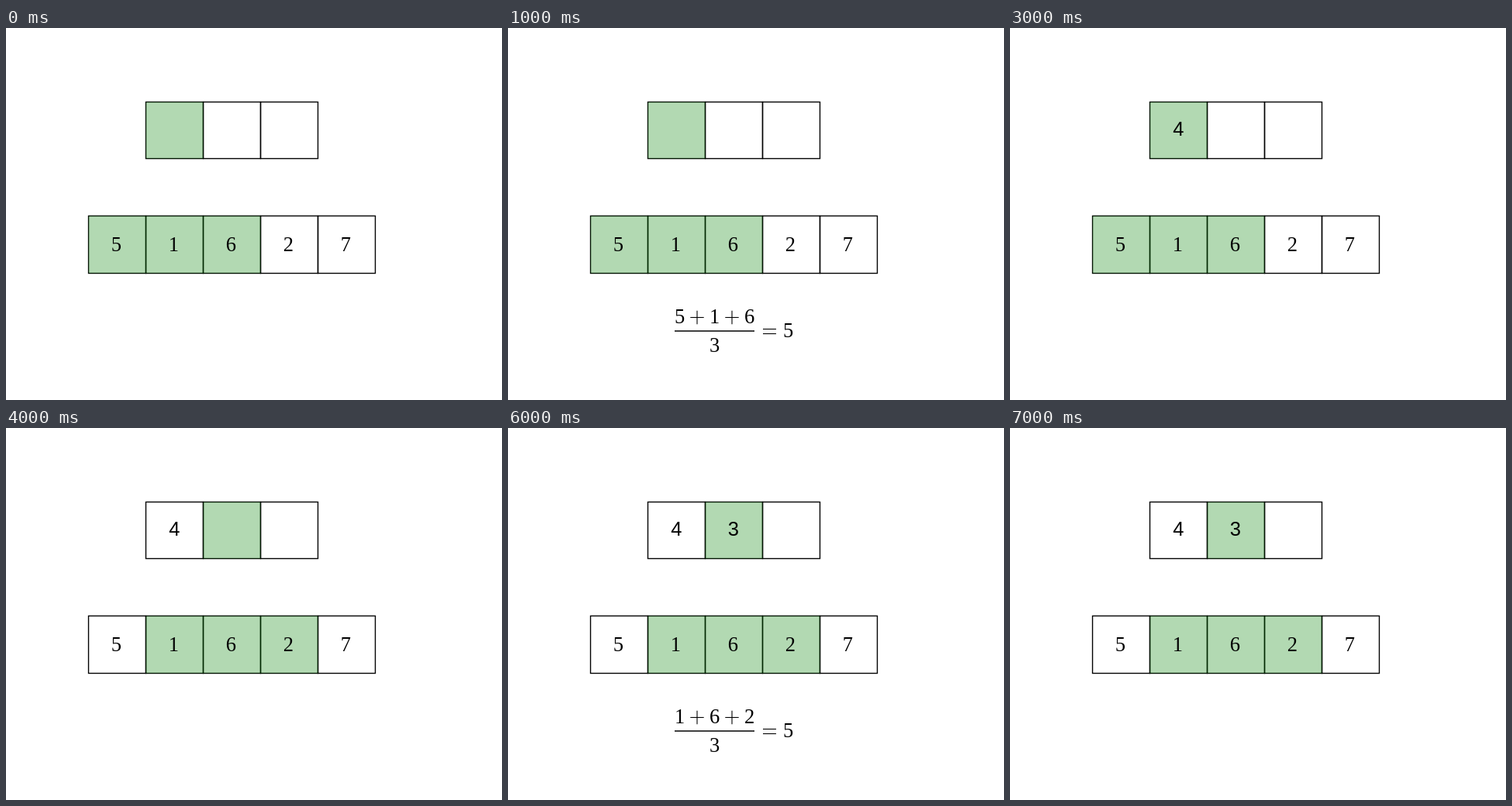
Recreate the animation shown at these times as an HTML page with a canvas. Size 640 by 480 pixels, loop 8000 ms.

```html
<!DOCTYPE html>
<html lang="en">
<head>
<meta charset="utf-8">
<title>Moving average</title>
<style>
  html, body { margin: 0; width: 640px; height: 480px; overflow: hidden; background: #fff; }
  canvas { display: block; }
</style>
</head>
<body>
<canvas id="stage" width="640" height="480"></canvas>
<script>
const ctx = document.getElementById('stage').getContext('2d');
const SERIF = '26.5px "Liberation Serif", serif';
const SANS = '25.5px "Liberation Sans", sans-serif';
const LOOP = 8000, STEP = 4000, CELL = 74;
const values = [5, 1, 6, 2, 7];
const averages = [4, 3];
const input = { x: 106.5, y: 242.5, h: 74, count: 5 };
const output = { x: 180.5, y: 95.5, h: 73, count: 3 };

function text(value, x, baseline, font = SERIF) {
  ctx.font = font;
  ctx.fillText(value, x, baseline);
}

function line(x1, y1, x2, y2, width) {
  ctx.lineWidth = width;
  ctx.beginPath();
  ctx.moveTo(x1, y1);
  ctx.lineTo(x2, y2);
  ctx.stroke();
}

function drawRow(row, first, shaded) {
  ctx.lineWidth = 1.39;
  for (let i = 0; i < row.count; i++) {
    ctx.strokeRect(row.x + i * CELL, row.y, CELL, row.h);
  }
  ctx.fillStyle = 'rgba(0, 128, 0, 0.3)';
  ctx.fillRect(row.x + first * CELL, row.y, shaded * CELL, row.h);
  ctx.fillStyle = '#000';
}

function drawPlus(x, y) {
  line(x - 8.7, y, x + 8.7, y, 1.1);
  line(x, y - 8.7, x, y + 8.7, 1.1);
}

function drawFormula(terms) {
  terms.forEach((term, i) => text(term, 221.5 + i * 45, 380.5));
  drawPlus(244, 373.5);
  drawPlus(289, 373.5);
  line(215, 391, 318, 391, 1.6);
  text(3, 266.5, 418);
  line(329, 388.5, 346, 388.5, 1.1);
  line(329, 394.5, 346, 394.5, 1.1);
  text(5, 361.5, 399);
}

function draw(time) {
  const step = Math.floor(time / STEP);
  const phase = time % STEP;
  ctx.fillStyle = '#fff';
  ctx.fillRect(0, 0, 640, 480);
  ctx.fillStyle = ctx.strokeStyle = '#000';
  ctx.textAlign = 'center';

  drawRow(output, step, 1);
  drawRow(input, step, 3);
  values.forEach((value, i) => text(value, 142.3 + i * CELL, 287.5));

  const known = step + (phase >= 2000 ? 1 : 0);
  averages.slice(0, known).forEach((value, i) => {
    text(value, 217.3 + i * 73.5, 138.7, SANS);
  });
  if (phase >= 1000 && phase < 3000) drawFormula(values.slice(step, step + 3));
}

const start = performance.now();
function tick() {
  draw((performance.now() - start) % LOOP);
  requestAnimationFrame(tick);
}
tick();
</script>
</body>
</html>
```
